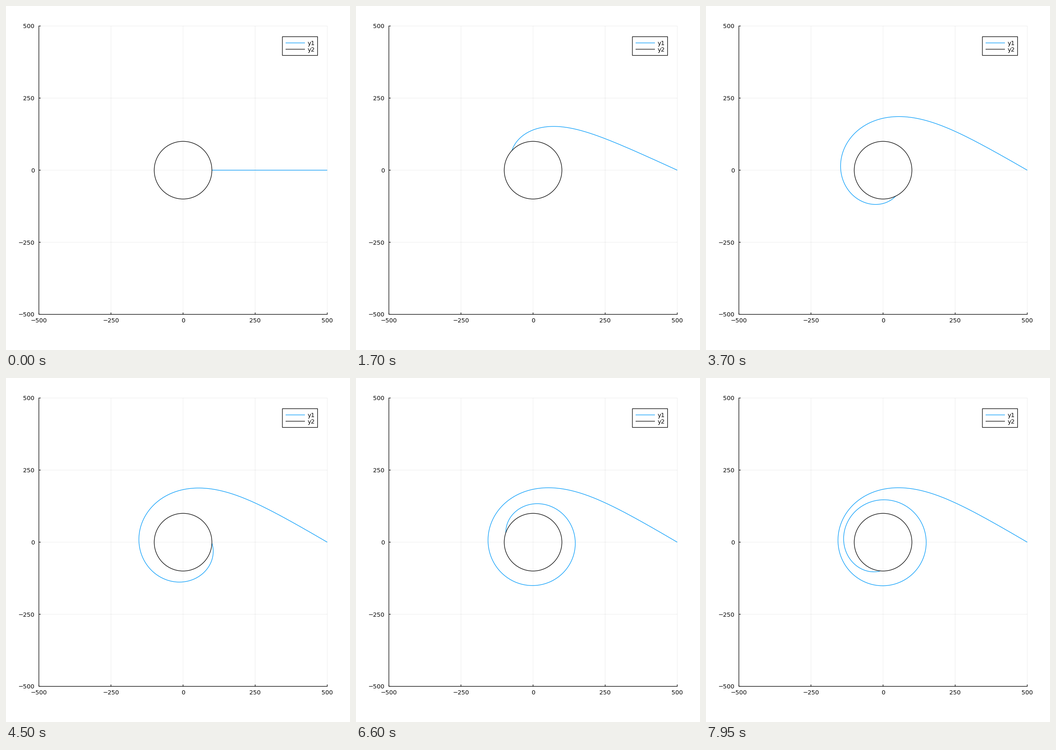
A matplotlib script that plays this animation: 748 by 748 pixels, repeating every 8000 ms.

```python
import numpy as np
import matplotlib.pyplot as plt
from matplotlib.animation import FuncAnimation
from matplotlib.patches import Rectangle

SIZE, DPI = 748, 100
FRAMES, INTERVAL = 160, 50
LEFT, RIGHT, TOP, BOTTOM = 71.5, 698.5, 43.5, 670.5
CX, CY = (LEFT + RIGHT) / 2, (TOP + BOTTOM) / 2
SCALE = (RIGHT - LEFT) / 1000
BLUE = "#009afa"
PX = 72 / DPI

RATE = 0.0337            # impact parameter = critical * tanh(RATE * frame)
S_PHOTON = 20 / 3        # 1000 / r at the photon sphere (r = 150)
S_START, S_END = 2, 10   # 1000 / r at r = 500 and at the horizon r = 100

fig = plt.figure(figsize=(SIZE / DPI, SIZE / DPI), dpi=DPI, facecolor="white")
ax = fig.add_axes([0, 0, 1, 1])
ax.set_xlim(0, SIZE)
ax.set_ylim(SIZE, 0)
ax.axis("off")


def px(x):
    return CX + SCALE * np.asarray(x)


def py(y):
    return CY - SCALE * np.asarray(y)


def line(x, y, color="black", width=1.2, **kw):
    kw.setdefault("solid_capstyle", "butt")
    return ax.plot(x, y, color=color, lw=width * PX, snap=False, **kw)[0]


def label(x, y, text, ha):
    ax.text(x, y, text, ha=ha, va="baseline", fontsize=13 * PX,
            family="DejaVu Sans", color="black", zorder=6)


def light_path(n):
    """Light ray around a black hole from (500, 0) down to the horizon."""
    e = 14.8148 / np.sinh(RATE * max(n, 1e-5)) ** 2
    root = np.sqrt(e)
    v = np.linspace(np.arcsinh((S_START - S_PHOTON) / root),
                    np.arcsinh((S_END - S_PHOTON) / root), 800)
    d = root * np.sinh(v)
    rate = root * np.cosh(v) / np.sqrt(e + d * d * (1 + 0.1 * d))
    steps = (rate[1:] + rate[:-1]) / 2 * np.diff(v)
    phi = np.concatenate([[0], np.cumsum(steps)])
    r = 1000 / (S_PHOTON + d)
    return px(r * np.cos(phi)), py(r * np.sin(phi))


# grid, ticks and tick labels
for value in (-500, -250, 0, 250, 500):
    x, y = px(value), py(value)
    text = str(value).replace("-", "\u2212")
    line([x, x], [TOP, BOTTOM], alpha=0.07, width=1, zorder=1)
    line([LEFT, RIGHT], [y, y], alpha=0.07, width=1, zorder=1)
    line([x, x], [BOTTOM, BOTTOM - 4], zorder=2)
    line([LEFT, LEFT + 4], [y, y], zorder=2)
    label(x, 688.5, text, "center")
    label(62, y + 4.8, text, "right")

line([LEFT, LEFT, RIGHT], [TOP, BOTTOM, BOTTOM], zorder=2,
     solid_joinstyle="miter", solid_capstyle="projecting")

# ray and horizon
ray = line([], [], BLUE, zorder=3)
turn = np.linspace(0, 2 * np.pi, 400)
line(px(100 * np.cos(turn)), py(100 * np.sin(turn)), zorder=4)

# legend
ax.add_patch(Rectangle((601, 66.7), 76.5, 40.8, facecolor="white",
                       edgecolor="black", lw=1.2 * PX, snap=False, zorder=5))
for y, color, name in ((80.3, BLUE, "y1"), (94, "black", "y2")):
    line([608, 650], [y, y], color, zorder=6)
    label(656, y + 4.7, name, "left")


def update(n):
    ray.set_data(*light_path(n))
    return (ray,)


anim = FuncAnimation(fig, update, frames=FRAMES, interval=INTERVAL,
                     init_func=lambda: update(0), repeat=True, repeat_delay=0)
plt.show()
```
